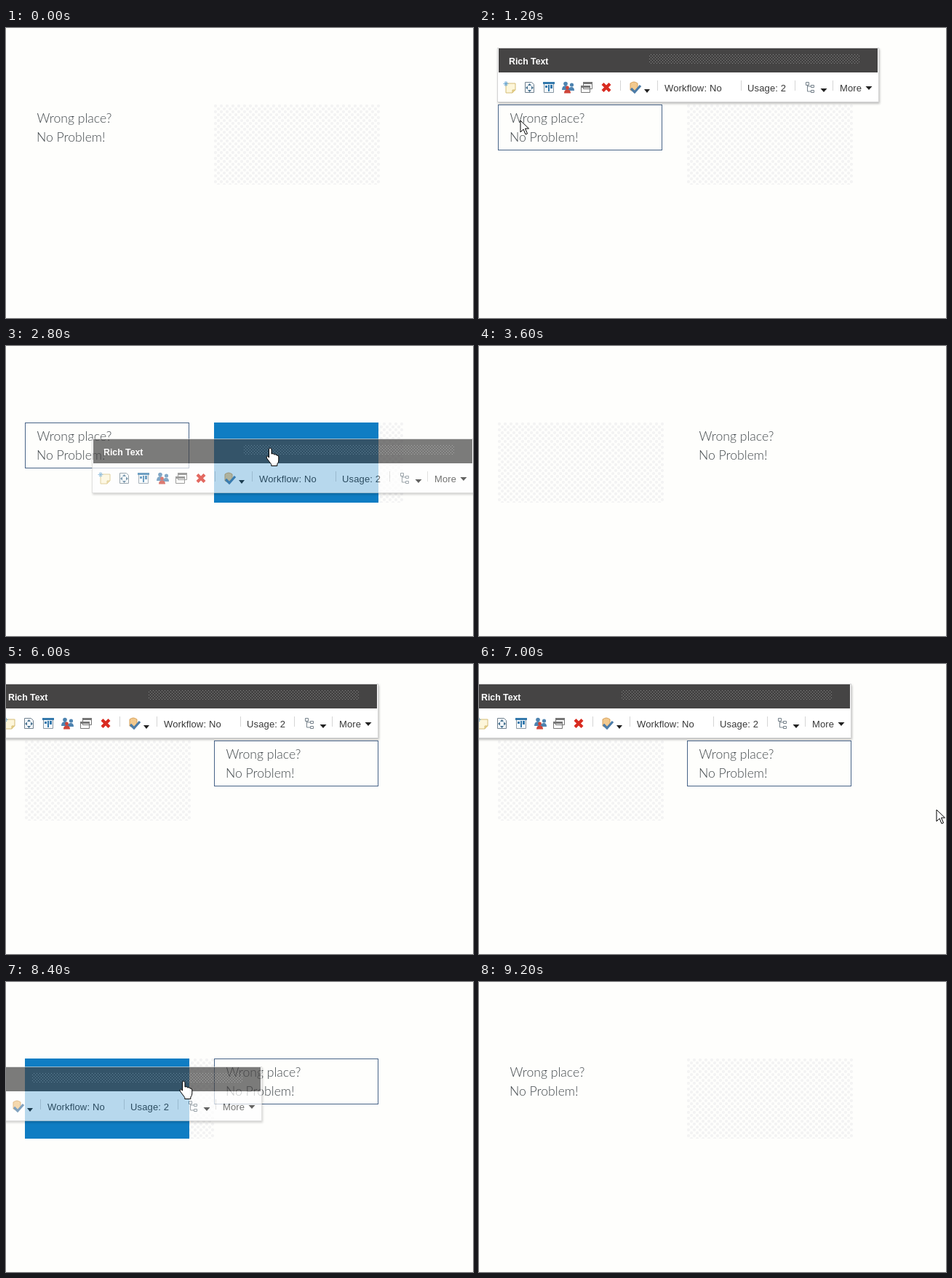
An HTML page that plays this animation: 642x398 px, repeating every 9.6 s.

```html
<!DOCTYPE html>
<html lang="en">
<head>
<meta charset="utf-8">
<title>Moving a content block</title>
<style>
  html, body { margin: 0; width: 100%; height: 100%; overflow: hidden; background: #fefefc; }
  svg { display: block; width: 642px; height: 398px; }
  .copy { font: 300 17.6px Lato, sans-serif; fill: #42484c; }
  .label { font: 13px "Liberation Sans", Arial, sans-serif; letter-spacing: .15px; fill: #383838; }
  .title { font: bold 12.3px "Liberation Sans", Arial, sans-serif; fill: #fff; }
  .line { fill: none; stroke: #77838c; }
  .cursor { display: none; fill: #fff; stroke: #000; stroke-linejoin: round; }
</style>
</head>
<body>
<svg viewBox="0 0 642 398">
  <defs>
    <pattern id="dots" width="8" height="8" patternUnits="userSpaceOnUse" y="105">
      <circle cx="2" cy="2" r="2.1" fill="#f3f3f3"/><circle cx="6" cy="6" r="2.1" fill="#f3f3f3"/>
    </pattern>
    <pattern id="grip" width="4" height="4" patternUnits="userSpaceOnUse">
      <path d="M0 0h1v1h-1zM2 2h1v1h-1z" fill="#858585"/>
    </pattern>
    <filter id="shadow" x="-5%" y="-10%" width="110%" height="130%">
      <feDropShadow dx="1" dy="2" stdDeviation="1.5" flood-color="#000" flood-opacity=".25"/>
    </filter>
  </defs>

  <g id="freeCell">
    <rect id="zone" y="105" height="110" fill="url(#dots)"/>
    <rect id="target" y="105" width="226" height="110" fill="#0f7dc3"/>
  </g>
  <g id="block">
    <rect id="frame" x=".5" y="105.5" width="225" height="62" fill="none" stroke="#486488"/>
    <text class="copy" x="16.5" y="130">Wrong place?</text>
    <text class="copy" x="16" y="156">No Problem!</text>
  </g>

  <g id="bar">
    <rect x="33.5" y="39.5" width="524" height="74" fill="#fff" stroke="#d4d4d4" filter="url(#shadow)"/>
    <rect x="35" y="40" width="521" height="33" fill="#454444"/>
    <rect x="242" y="48" width="289" height="14" fill="url(#grip)"/>
    <text class="title" x="49" y="62">Rich Text</text>
    <!-- note -->
    <path d="M45 88h13v9l-4 4h-9z" fill="#fdf6da" stroke="#d5bd76"/>
    <path d="M58 97h-4v4" fill="#ecd58d" stroke="#d5bd76"/>
    <path d="M45 85v7M41.500 88.500h7M43 86l4 5M47 86l-4 5" stroke="#66a5d5"/>
    <!-- page with arrows -->
    <path d="M71.500 86.500h9l3 3v11h-12z" fill="#f4f7fa" stroke="#71818f"/>
    <path d="M77.500 88l2.500 3h-5zM77.500 100l2.500-3h-5zM72 94l3-2.500v5zM83 94l-3-2.500v5z" fill="#46718f"/>
    <!-- template -->
    <path d="M97.500 87.500h13v13h-13z" fill="#f5f9fc" stroke="#8796a2"/>
    <path d="M96 86h16v3h-16zM99 91h3v3h-3zM103 90h2v9h-2zM106 90h3v5h-3z" fill="#3479ac"/>
    <!-- people -->
    <g fill="#4d83b0"><circle cx="127" cy="88.500" r="2.800"/><circle cx="135.500" cy="90" r="2.600"/>
      <path d="M122 97q0-6 5-6t5 6zM131 98q0-5 4-5t4 5z"/></g>
    <g fill="#cf4438"><circle cx="129.500" cy="94" r="2.400"/><path d="M125 101.500q0-5 4.500-5t4.500 5z"/></g>
    <!-- windows -->
    <path d="M151.500 86.500h12v9h-12zM148.500 91.500h12v9h-12z" fill="#fafafa" stroke="#777"/>
    <path d="M151 86h13v3h-13zM148 91h13v3h-13z" fill="#777"/>
    <!-- delete -->
    <path d="M178 88.500l10 10M188 88.500l-10 10" stroke="#d92b20" stroke-width="4.200"/>
    <!-- approve -->
    <path d="M216 88q5-4 10 0v9q-5 4-10 0z" fill="#f2c98e" stroke="#d8a25c"/>
    <path d="M217 95l5 5 8-9" fill="none" stroke="#4c7ca8" stroke-width="3.200"/>
    <!-- tree -->
    <path class="line" d="M457.500 86.500h4v4h-4zM464.500 90.500h4v3h-4zM464.500 97.500h4v3h-4zM459.500 91v8h5M459.500 92h5"/>
    <path d="M202.500 84v14M253.500 84v14M368.500 84v14M442.500 84v14M494.500 84v14" stroke="#d5d5d5"/>
    <path d="M235 96h8l-4 5zM477.500 95h9l-4.500 5zM539.500 92h9l-4.500 5z" fill="#222"/>
    <text class="label" x="263" y="99">Workflow: No</text>
    <text class="label" x="377" y="99">Usage: 2</text>
    <text class="label" x="504" y="99">More</text>
  </g>

  <path class="cursor" id="arrow" d="M0 0v16l4-4 3 7 2.500-1-3-7h5z"/>
  <path class="cursor" id="move" d="M0-11l4 4.500h-2.500v5h5v-2.500l4.500 4-4.500 4v-2.500h-5v5h2.500l-4 4.500-4-4.500h2.500v-5h-5v2.500l-4.500-4 4.500-4v2.500h5v-5h-2.500z"/>
  <path class="cursor" id="hand" d="M-1.500 1q0-2 1.700-2t1.800 2v6q3-1.500 3.500 1 3-1 3.500 1 2.800-.5 2.800 2v5q0 3-2 5v2.500h-8v-2l-6-8q-1.500-3 .5-3.500l2.200 2z"/>
</svg>

<script>
const LOOP = 9600, STEP = 200;
const COLUMNS = [26, 286];

// time, column holding the text, what is happening
const phases = [
  [0, 0, 'idle'], [1200, 0, 'select'], [2400, 0, 'drag'], [2600, 0, 'hover'],
  [3400, 1, 'idle'], [6000, 1, 'select'], [8200, 1, 'drag'], [8400, 1, 'hover'],
  [9000, 0, 'idle']
];

// time, x, y, then the pointer shape where there is one
const pointer = [
  [0, 0, 0, ''], [200, 175, 206, 'arrow'], [600, 57, 127, 'arrow'], [1200, 57, 127, 'arrow'],
  [2000, 260, 46, 'move'], [2200, 277, 50, 'move'], [2400, 297, 76, 'move'],
  [2600, 345, 122, 'hand'], [3000, 380, 160, 'hand'], [3400, 380, 160, 'arrow'],
  [3600, 0, 0, ''], [7000, 629, 200, 'arrow'], [7800, 450, 56, 'move'],
  [8000, 428, 40, 'move'], [8200, 385, 66, 'move'], [8400, 244, 137, 'hand'],
  [9000, 244, 137, 'arrow'], [9200, 0, 0, '']
];
const toolbar = [
  [1200, -8, -12], [2200, -8, -12], [2400, 0, 0], [2800, 85, 88], [3000, 95, 112],
  [3400, 95, 112], [6000, -46, -12], [8000, -46, -12], [8200, -72, 2],
  [8400, -206, 77], [8600, -230, 84]
];

const el = id => document.getElementById(id);
const cursors = ['arrow', 'move', 'hand'].map(el);
const lastIndex = (rows, t) => Math.max(0, rows.findLastIndex(row => row[0] <= t));
const show = (node, on) => node.style.display = on ? 'inline' : 'none';
const place = (node, [x, y]) => node.setAttribute('transform', `translate(${x} ${y})`);

function along(rows, t) {
  const i = lastIndex(rows, t), a = rows[i], b = rows[i + 1] || a;
  const p = b === a ? 0 : Math.max(0, (t - a[0]) / (b[0] - a[0]));
  return [1, 2].map(k => Math.round(a[k] + (b[k] - a[k]) * p));
}

function render(t) {
  const [, column, mode] = phases[lastIndex(phases, t)];
  const dragging = mode === 'drag' || mode === 'hover';

  place(el('block'), [COLUMNS[column], 0]);
  show(el('frame'), mode !== 'idle');
  place(el('freeCell'), [COLUMNS[1 - column], 0]);
  el('zone').setAttribute('width', dragging ? 260 : 228);
  show(el('target'), mode === 'hover');

  show(el('bar'), mode !== 'idle');
  el('bar').setAttribute('opacity', dragging ? .7 : 1);
  place(el('bar'), along(toolbar, t));

  const shape = pointer[lastIndex(pointer, t)][3];
  for (const node of cursors) {
    show(node, node.id === shape);
    place(node, along(pointer, t));
  }
}

const start = performance.now();
function tick() {
  const t = (performance.now() - start) % LOOP;
  render(Math.floor(t / STEP) * STEP);
  requestAnimationFrame(tick);
}
tick();
</script>
</body>
</html>
```
